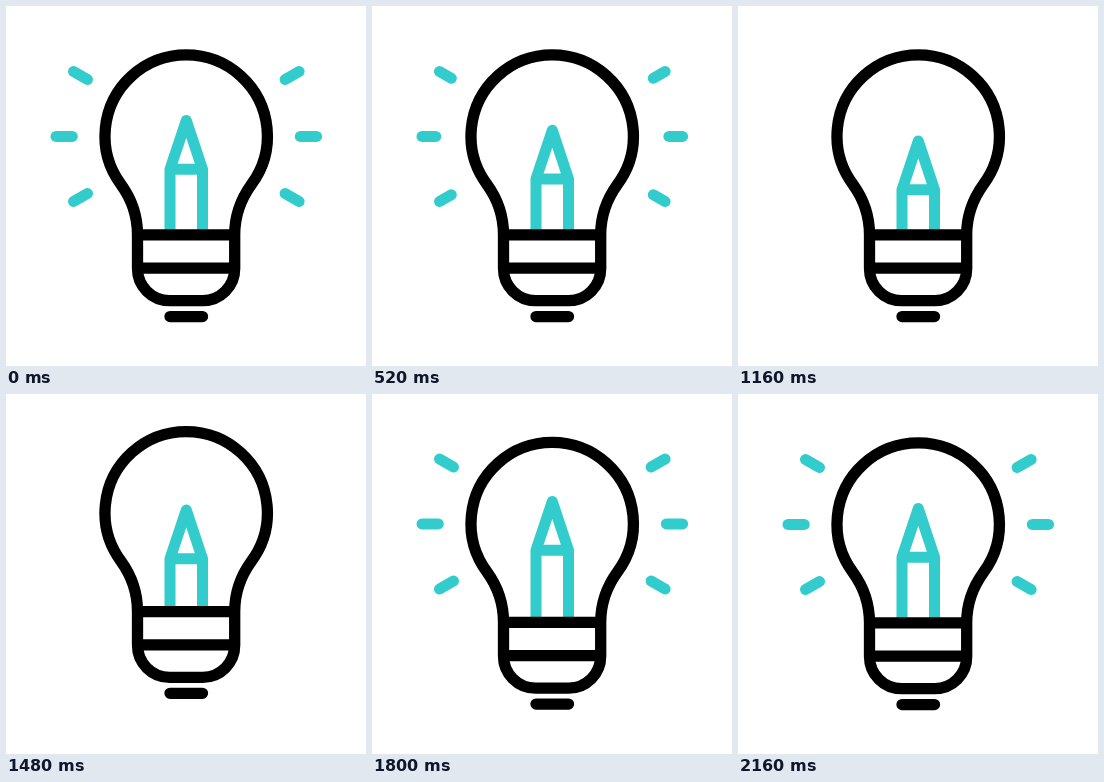
An HTML page for the animation above (2280 ms loop, 360 px wide and 360 px high).

```html
<!DOCTYPE html>
<html lang="en">
<head>
<meta charset="utf-8">
<title>Bright idea</title>
<style>
  html, body { margin: 0; width: 100%; height: 100%; overflow: hidden; background: #fff; }
  svg { display: block; width: 100%; height: 100%; }
  g { fill: none; stroke: #000; stroke-width: 11.3; stroke-linecap: round; stroke-linejoin: round; }
  .teal { stroke: #33cccc; stroke-width: 11; }
</style>
</head>
<body>
<svg viewBox="0 0 360 360">
  <g id="lamp">
    <g id="rays" class="teal"></g>
    <path id="pencil" class="teal"/>
    <path d="M131.5 228.8 C131.5 210.5 125.8 193.4 115.1 178.6 A81.2 81.2 0 1 1 245.3 178.6
             C234.6 193.4 228.7 210.5 228.7 228.8 V262.5 A32 32 0 0 1 196.7 294.6 H163.5
             A32 32 0 0 1 131.5 262.5 Z M131.5 228.8 H228.7 M131.5 262.2 H228.7 M164 310.6 H196.5"/>
  </g>
</svg>
<script>
  const LOOP = 2280, STEP = 40, MID = 180.3;

  // Each track is a list of [time, value], eased between neighbours.
  const lift = [[1220, 0], [1640, -16.5], [1820, 0]];
  const slide = [[170, 0], [890, 20.5], [1375, 20.5], [1676, -7.8], [2160, 0]];
  const rayInner = [[450, 0], [720, 1], [1479, 1], [1480, 0]];
  const rayOuter = [[1479, 1], [1480, 0], [1710, 1]];

  // Left-hand rays as inner x, inner y, outer x, outer y, measured from MID.
  const rayEnds = [
    [-98.8, 73.5, -112.8, 65.5],
    [-114, 130.4, -130.3, 130.4],
    [-98.8, 187.5, -112.8, 195.5]
  ];

  const lamp = document.getElementById("lamp");
  const pencil = document.getElementById("pencil");
  const rayBox = document.getElementById("rays");
  const rays = [];

  for (const side of [1, -1]) {
    for (const [x1, y1, x2, y2] of rayEnds) {
      const line = document.createElementNS("http://www.w3.org/2000/svg", "line");
      rayBox.append(line);
      rays.push({ line, x: MID + side * x1, y: y1, dx: side * (x2 - x1), dy: y2 - y1 });
    }
  }

  const ease = p => (1 - Math.cos(Math.PI * p)) / 2;

  function at(track, t) {
    if (t <= track[0][0]) return track[0][1];
    for (let i = 1; i < track.length; i++) {
      const [t0, a] = track[i - 1], [t1, b] = track[i];
      if (t < t1) return a + (b - a) * ease((t - t0) / (t1 - t0));
    }
    return track[track.length - 1][1];
  }

  function draw(t) {
    lamp.setAttribute("transform", `translate(0 ${at(lift, t)})`);

    const s = at(slide, t), bar = 163.3 + s;
    pencil.setAttribute("d",
      `M164 228 V${bar} L${MID} ${114.5 + s} L196.5 ${bar} V228 M164 ${bar} H196.5`);

    const from = at(rayInner, t), to = at(rayOuter, t);
    rayBox.style.display = to - from > 0.01 ? "" : "none";
    for (const { line, x, y, dx, dy } of rays) {
      line.setAttribute("x1", x + dx * from);
      line.setAttribute("y1", y + dy * from);
      line.setAttribute("x2", x + dx * to);
      line.setAttribute("y2", y + dy * to);
    }
  }

  const start = performance.now();
  function tick(now) {
    const t = Math.max(0, now - start) % LOOP;
    draw(Math.floor(t / STEP) * STEP);
    requestAnimationFrame(tick);
  }
  draw(0);
  requestAnimationFrame(tick);
</script>
</body>
</html>
```
